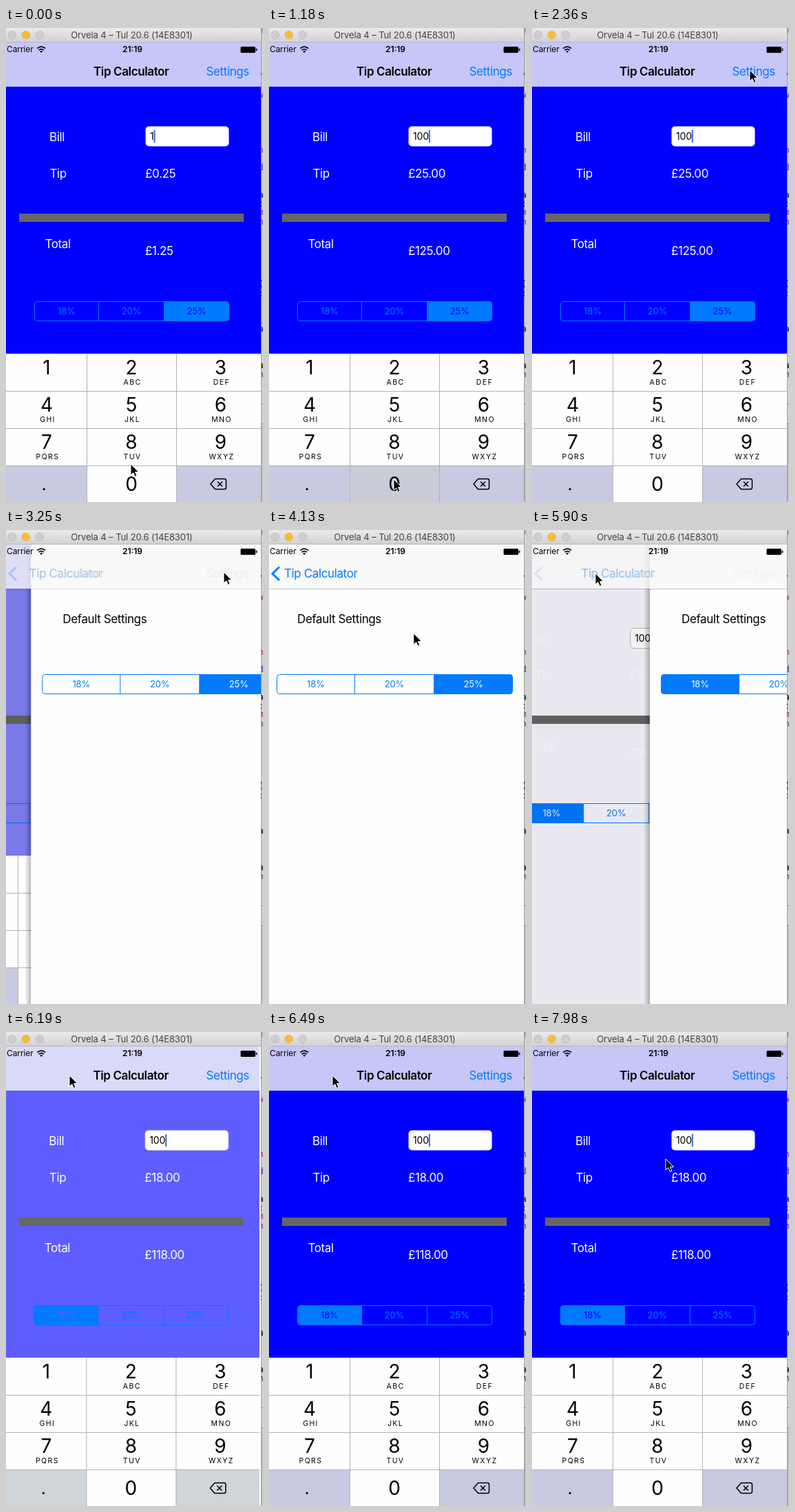
An HTML page that plays this animation: 373x687 px, repeating every 8 s.

```html
<!DOCTYPE html>
<html lang="en">
<head>
<meta charset="utf-8">
<title>Tip Calculator</title>
<style>
  html, body { margin: 0; width: 100%; height: 100%; overflow: hidden; background: #fff; }
  svg { display: block; width: 373px; height: 687px; }
  text { font-family: Inter, "Open Sans", sans-serif; white-space: pre; }
  .body { font-size: 17px; letter-spacing: -.38px; }
  .small { font-size: 13px; letter-spacing: -.1px; }
  .code { font: 12px "DejaVu Sans Mono", monospace; }
</style>
</head>
<body>
<svg id="stage" viewBox="0 0 373 687" xmlns="http://www.w3.org/2000/svg"></svg>
<script>
const LOOP = 8000, TICK = 147.6;
const LEFT = -5, WIDTH = 375, PARALLAX = 112.5;
const PUSH = 3052, POP = 5822;
const TINT = '#007aff';

const text = (x, y, str, attrs = '') => `<text x="${x}" y="${y}" ${attrs}>${str}</text>`;
const rect = (x, y, w, h, attrs = '') =>
  `<rect x="${x}" y="${y}" width="${w}" height="${h}" ${attrs}/>`;
const MID = 'text-anchor="middle"';

// Three-part segmented control; edges holds its four vertical lines.
function segments(id, edges, top) {
  const [a, b, c, d] = edges, h = 28;
  const fills = [
    `M${b} ${top}H${a + 4}q-4 0 -4 4v${h - 8}q0 4 4 4H${b}Z`,
    `M${b} ${top}H${c}v${h}H${b}Z`,
    `M${c} ${top}H${d - 4}q4 0 4 4v${h - 8}q0 4 -4 4H${c}Z`
  ];
  return fills.map((p, i) => `<path id="${id}Fill${i}" d="${p}" fill="${TINT}"/>`).join('') +
    rect(a, top, d - a, h, `rx="4" fill="none" stroke="${TINT}"`) +
    `<path d="M${b} ${top}v${h}M${c} ${top}v${h}" stroke="${TINT}"/>` +
    ['18%', '20%', '25%'].map((s, i) =>
      text((edges[i] + edges[i + 1]) / 2, top + 18.8, s, `id="${id}Text${i}" class="small" ${MID}`)).join('');
}

function keyboard() {
  const centers = [59, 182, 311.5];
  const letters = ['', 'ABC', 'DEF', 'GHI', 'JKL', 'MNO', 'PQRS', 'TUV', 'WXYZ'];
  const keys = letters.map((s, i) => {
    const x = centers[i % 3], y = 502 + 54 * Math.floor(i / 3);
    return text(x, y, i + 1, `font-size="28" ${MID}`) +
      text(x + 1.5, y + 15, s, `font-size="10.5" letter-spacing="1.4" ${MID}`);
  }).join('');
  return `<g id="keyboard">${rect(LEFT, 472, WIDTH, 215, 'fill="#fefefe"')}
    <g id="sideKeys">${rect(LEFT, 634, 122.5, 53)}${rect(247.5, 634, 122.5, 53)}</g>
    ${rect(118, 635, 129, 52, 'id="zeroDown" fill="#c9cbd6"')}
    <path d="M${LEFT} 526.5H370M${LEFT} 580.5H370M${LEFT} 634.5H370M117.5 472V687M247.5 472V687" stroke="#b2b2b6"/>
    ${keys}${text(182, 671, '0', `font-size="28" ${MID}`)}${text(55, 670, '.', `font-size="25" ${MID}`)}
    <path d="M303.5 653.5H317q2.5 0 2.5 2.5v10q0 2.5 -2.5 2.5H303.5L297 661ZM307 657.5l7 7m0 -7l-7 7"
      fill="none" stroke="#000" stroke-width="1.5" stroke-linejoin="round"/></g>`;
}

// Slivers of an editor window showing past the right edge.
function editor() {
  const bits = [[67, ','], [101, 'w', 1], [181, 'n', 1], [206, 'd', 2], [246, 'a'], [259, ':'], [271, 'm', 1],
    [285, 'n', 2], [375, '('], [389, ':'], [440, 'a'], [493, 'a'], [506, 'n', 2]];
  const colors = ['#000', '#b5179e', '#6a2fa0'];
  return rect(370, 0, 3, 687, 'fill="#fff"') + rect(370, 0, 3, 7, 'fill="#d5d5d5"') +
    bits.map(([y, s, c = 0]) => text(366.5, y, s, `class="code" fill="${colors[c]}"`)).join('') +
    rect(370, 544, 3, 1, 'fill="#b8b8b8"') + rect(370, 573, 3, 114, 'fill="#ececec"') +
    rect(370, 573, 3, 1, 'fill="#b8b8b8"') + rect(370, 0, 3, 687, 'fill="url(#edge)"');
}

const homePage = `<g id="home">
  ${rect(LEFT, 21, WIDTH, 666, 'id="homeBack"')}
  <g class="body" fill="#fff">${text(63, 164, 'Bill')}${text(63.5, 217, 'Tip')}${text(56.5, 319, 'Total')}
    ${text(202, 217, '', 'id="tip"')}${text(202, 329, '', 'id="total"')}</g>
  ${rect(202.5, 142.5, 121, 29, 'id="field" rx="5" fill="#fff" stroke="#bbb"')}
  ${text(209, 162, '', 'id="bill" font-size="14" letter-spacing="-.2"')}
  ${rect(0, 148, 2, 18, 'id="caret" fill="#3f63e0"')}
  ${rect(19, 269, 326, 12, 'fill="#666"')}
  ${segments('home', [41.5, 134.5, 229.5, 323.5], 396.5)}
  ${rect(LEFT, 21, WIDTH, 666, 'id="dim"')}
  ${keyboard()}</g>`;

const settingsPage = `<g id="settings">
  ${rect(LEFT - 9, 21, 9, 666, 'id="shadow" fill="url(#shade)"')}
  ${rect(LEFT, 21, WIDTH, 666, 'fill="#fefefe"')}
  ${text(41, 135, 'Default Settings', 'class="body"')}
  ${segments('set', [11.5, 124.5, 239.5, 353.5], 209.5)}</g>`;

const navBar = `${rect(0, 21, 370, 64, 'fill="#f8f8f8" opacity=".8"')}
  ${rect(0, 85, 370, 1, 'id="navLine" fill="#000"')}
  <g class="body">
    ${text(127, 69, 'Tip Calculator', 'id="title" font-weight="600"')}
    ${text(22, 69, 'Tip Calculator', `id="backLabel" fill="${TINT}"`)}
    ${text(290.5, 69, 'Settings', `id="settingsButton" fill="${TINT}"`)}
  </g>
  <path id="chevron" d="M15 53.5L5 63.2L15 73" fill="none" stroke="${TINT}" stroke-width="3"/>`;

const statusBar = `${text(1, 35, 'Carrier', 'font-size="12" letter-spacing="-.1"')}
  <g fill="none" stroke="#000" stroke-width="1.7"><path d="M45.3 29.6q5.9 -5 11.8 0M47.5 32.1q3.7 -3 7.4 0"/></g>
  <path d="M51.2 36l-2.1 -2.2q2.1 -1.6 4.2 0Z"/>
  ${text(183.5, 35, '21:19', `font-size="12" font-weight="600" ${MID}`)}
  ${rect(340.5, 27, 21.5, 9, 'rx="1.5"')}${rect(362.8, 29.5, 1.5, 4, 'rx=".7"')}`;

const titleBar = rect(0, 0, 370, 20.5, 'fill="url(#bar)"') + rect(0, 20, 370, 1, 'fill="#b9b9b9"') +
  ['#cfcdcf', '#fdbc2e', '#cfcdcf'].map((c, i) =>
    `<circle cx="${8.8 + 20 * i}" cy="10" r="5.8" fill="${c}" stroke="#000" stroke-opacity=".1"/>`).join('') +
  text(182.5, 15, 'Orvela 4 – Tul 20.6 (14E8301)', `font-size="13" letter-spacing="-.1" fill="#444" ${MID}`);

document.getElementById('stage').innerHTML = `<defs>
  <linearGradient id="bar" x2="0" y2="1"><stop stop-color="#ebe9eb"/><stop offset="1" stop-color="#d2d0d2"/></linearGradient>
  <linearGradient id="shade"><stop stop-opacity="0"/><stop offset="1" stop-opacity=".28"/></linearGradient>
  <linearGradient id="edge"><stop stop-opacity=".4"/><stop offset="1" stop-opacity=".08"/></linearGradient>
  <clipPath id="screen">${rect(0, 20, 370, 667)}</clipPath></defs>
  ${editor()}${titleBar}
  <g clip-path="url(#screen)">${homePage}${settingsPage}${navBar}${statusBar}</g>
  <path id="pointer" d="M0 0V16L3.8 12.6L6.4 18.4L9 17.3L6.5 11.6H11.6Z" stroke="#fff" stroke-linejoin="round"/>`;

const el = {};
document.querySelectorAll('[id]').forEach(node => el[node.id] = node);
const set = (id, attrs) => { for (const k in attrs) el[id].setAttribute(k, attrs[k]); };
const show = (id, on) => set(id, { opacity: Number(on) });

const clamp = v => Math.min(1, Math.max(0, v));
const ease = v => (1 - Math.cos(Math.PI * clamp(v))) / 2;
const spring = ms => { const k = Math.max(0, ms) * .0193; return k > 9 ? 1 : 1 - (1 + k) * Math.exp(-k); };
const fadeIn = ms => clamp(ms / 375) ** 2;
const fadeOut = ms => ms > 420 ? 0 : Math.exp(-Math.max(0, ms) * .0125);
const mix = (a, b, k) => `rgb(${a.map((v, i) => Math.round(v + (b[i] - v) * k))})`;
const within = (t, a, b) => t >= a && t < b;

const route = [[150, 181, 632], [590, 181, 654], [1500, 181, 654], [2360, 316, 61], [3850, 316, 61],
  [4430, 95, 246], [4720, 62, 222], [5015, 80, 198], [5460, 92, 63], [7400, 92, 63], [7530, 98, 51], [7970, 194, 184]];

function pointerAt(t) {
  const i = route.findIndex(p => p[0] > t);
  if (i < 1) return (i ? route[route.length - 1] : route[0]).slice(1);
  const [t0, x0, y0] = route[i - 1], [t1, x1, y1] = route[i];
  const k = ease((t - t0) / (t1 - t0));
  return [x0 + (x1 - x0) * k, y0 + (y1 - y0) * k];
}

function paintSegments(id, selected, background) {
  for (let i = 0; i < 3; i++) {
    show(id + 'Fill' + i, i === selected);
    set(id + 'Text' + i, { fill: i === selected ? background : TINT });
  }
}

function draw(t) {
  const popping = t >= POP;
  const shown = popping ? 1 - spring(t - POP) : spring(t - PUSH);
  const white = popping ? 1 - ease((t - POP) / 645) : ease((t - 2990) / 500);
  const background = mix([0, 0, 255], [255, 255, 255], white);

  const digits = t < 730 ? 1 : t < 1175 ? 2 : 3;
  const bill = 10 ** (digits - 1);
  const selected = t < 4860 ? 2 : 0;
  const tip = bill * (t < 4860 ? .25 : .18);
  el.bill.textContent = bill;
  el.tip.textContent = '£' + tip.toFixed(2);
  el.total.textContent = '£' + (bill + tip).toFixed(2);

  const typing = !within(t, POP, 6000);
  const blink = within(t, 6930, 7075) || within(t, 7815, 7965);
  set('caret', { x: 206 + 8.6 * digits });
  show('caret', typing && !blink);
  show('keyboard', typing);
  show('zeroDown', within(t, 730, 880) || within(t, 1175, 1325));

  set('homeBack', { fill: background });
  set('field', { 'stroke-opacity': white });
  set('sideKeys', { fill: mix([200, 202, 225], [208, 213, 218], popping ? clamp(white * 3) : 0) });
  set('dim', { opacity: .1 * shown });
  set('home', { transform: `translate(${-PARALLAX * shown})` });
  set('settings', { transform: `translate(${WIDTH * (1 - shown)})`, visibility: shown > 0 ? 'visible' : 'hidden' });
  set('shadow', { opacity: clamp(shown * 3) });
  paintSegments('home', selected, background);
  paintSegments('set', selected, '#fff');

  const homeNav = popping ? fadeIn(t - POP) : fadeOut(t - PUSH);
  const backNav = popping ? fadeOut(t - POP) : fadeIn(t - PUSH);
  const backPress = within(t, 5700, POP) ? .4 : 1;
  const slide = -105 * shown;
  set('title', { opacity: homeNav, transform: `translate(${slide})` });
  set('backLabel', { opacity: backNav * backPress, transform: `translate(${105 + slide})` });
  set('chevron', { opacity: backPress * (popping ? backNav ** 2 : backNav) });
  set('settingsButton', { opacity: homeNav * (within(t, 2790, PUSH) ? .35 : 1) });
  set('navLine', { opacity: .22 * white });

  set('pointer', { transform: `translate(${pointerAt(t)})` });
}

// Each picture is held for one tick.
function frame() {
  const t = performance.now() % LOOP;
  draw(Math.floor((t + 12) / TICK) * TICK);
  requestAnimationFrame(frame);
}
frame();
</script>
</body>
</html>
```
